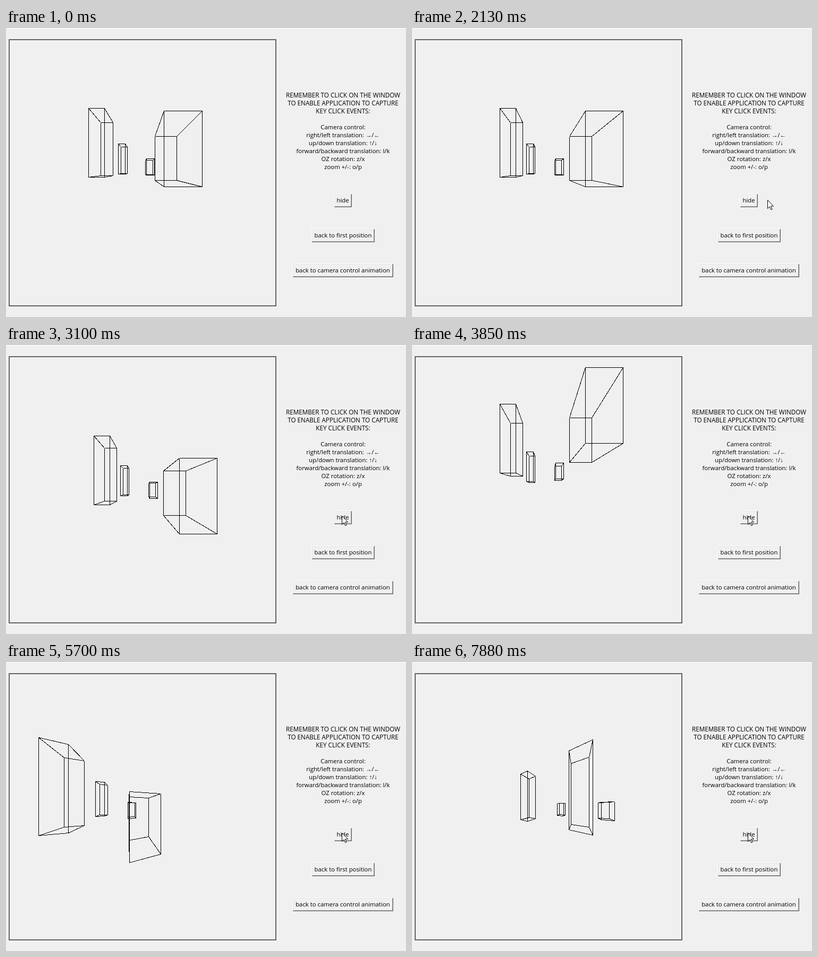
An HTML page for the animation above (8 s loop, 753 px wide and 545 px high).

```html
<!DOCTYPE html>
<html lang="en">
<head>
<meta charset="utf-8">
<title>Camera control</title>
<style>
  html, body { margin: 0; width: 753px; height: 545px; overflow: hidden; background: #f0f0f0; }
  svg { display: block; }
  text { font: 11.35px "Open Sans", "Noto Sans", sans-serif; text-anchor: middle; }
  .caps { font-size: 11.7px; }
  .sharp { shape-rendering: crispEdges; }
  #scene path { stroke: #000; fill: none; }
  #scene.solid path { stroke: #f00; fill: #1f1; }
</style>
</head>
<body>
<svg width="753" height="545" viewBox="0 0 753 545">
  <clipPath id="view"><rect x="7" y="23" width="500" height="500"/></clipPath>
  <rect class="sharp" width="753" height="1" fill="#fff"/>
  <rect class="sharp" x="6" y="22" width="502" height="502" fill="none" stroke="#646464" stroke-width="2"/>
  <g clip-path="url(#view)"><g id="scene" class="sharp"></g></g>
  <g id="help"></g>
  <g id="buttons"></g>
  <path id="cursor" d="M.5 .5V16.5L4.2 13L6.8 18.7L9 17.7L6.5 12H11.5Z" fill="#fff" stroke="#000"/>
</svg>
<script>
const NS = 'http://www.w3.org/2000/svg';
const $ = id => document.getElementById(id);

function add(parent, tag, attrs, label = '') {
  const el = document.createElementNS(NS, tag);
  for (const k in attrs) el.setAttribute(k, attrs[k]);
  el.textContent = label;
  return parent.appendChild(el);
}

[
  'REMEMBER TO CLICK ON THE WINDOW', 'TO ENABLE APPLICATION TO CAPTURE', 'KEY CLICK EVENTS:', '',
  'Camera control:', 'right/left translation: →/←', 'up/down translation: ↑/↓',
  'forward/backward translation: l/k', 'OZ rotation: z/x', 'zoom +/-: o/p'
].forEach((line, i) =>
  add($('help'), 'text', { x: 634.5, y: 131 + 15 * i, class: i < 3 ? 'caps' : '' }, line));

function button(x, y, w, label) {
  const g = add($('buttons'), 'g', { transform: `translate(${x} ${y})` });
  const bevel = (inset, lit) => add(g, 'path', {
    class: 'sharp', fill: 'none', 'stroke-linecap': 'square',
    d: lit ? `M${inset + .5} ${25.5 - inset}V${inset + .5}H${w - inset - .5}`
           : `M${inset + .5} ${25.5 - inset}H${w - inset - .5}V${inset + .5}`
  });
  const edges = [bevel(0, false), bevel(1, false), bevel(0, true), bevel(1, true)];
  const text = add(g, 'text', { x: w / 2, y: 17 }, label);
  const raised = ['#696969', '#a0a0a0', '#fff', '#e3e3e3'];
  const sunken = ['#fff', '#e3e3e3', '#a0a0a0', '#696969'];
  const press = down => {
    edges.forEach((e, i) => e.setAttribute('stroke', (down ? sunken : raised)[i]));
    text.setAttribute('transform', down ? 'translate(1 1)' : '');
  };
  press(false);
  return press;
}
const pressHide = button(617, 312, 34, 'hide');
button(575, 378, 119, 'back to first position');
button(539, 444, 190, 'back to camera control animation');

// Boxes, far to near: x, top, z, side, height
const boxes = [[-10, -12, 23, 3, 13], [1.5, -4, 16.5, 2.5, 5], [-10, -12, 10, 3, 13], [1.5, -4, 3.5, 2.5, 5]];
// Corner bits: 1 right, 2 bottom, 4 back
const faces = ['5467', '4026', '1573', '4510', '2376', '0132'];
const edges = ['01', '23', '45', '67', '02', '13', '46', '57', '04', '15', '26', '37'];
const paths = boxes.map(() => add($('scene'), 'path', {}));

// x, y: first moves; turn: 15 degree steps; pan: move at 30 degrees; end: last move
const start = { x: 0, y: 0, turn: 0, pan: 0, end: 0, cursor: null, solid: false, down: false };
const steps = [
  [150, { cursor: [707, 366] }], [300, { cursor: [689, 346] }], [440, { cursor: [675, 330] }],
  [590, { cursor: [669, 324] }], [790, { x: 1 }],
  [1160, { y: -1 }], [1310, { y: -2 }], [1460, { y: -3 }], [1740, { y: -2 }], [1860, { y: -1 }],
  [2130, { y: 0 }], [2250, { y: 1 }], [2400, { y: 2 }], [2550, { y: 3 }],
  [2690, { cursor: [648, 328] }], [2830, { cursor: [633, 325] }],
  [3100, { y: 2, cursor: [632, 322] }], [3220, { y: 1 }], [3350, { y: 0 }], [3470, { y: -1 }],
  [3600, { y: -2 }], [3720, { y: -3 }], [3850, { y: -4 }],
  [4130, { y: -5 }], [4260, { y: -6 }], [4410, { down: true }], [4560, { down: false, solid: true }],
  [4710, { y: -5, solid: false }], [5250, { y: -3 }], [5400, { y: 3 }],
  [5700, { turn: 1 }], [5820, { turn: 2 }], [5940, { pan: 1 }],
  [6470, { pan: 2 }], [6620, { pan: 8 }], [6770, { pan: 15 }], [6900, { pan: 22 }], [7030, { pan: 29 }],
  [7240, { turn: 3 }], [7360, { turn: 4 }], [7630, { end: 1 }], [7880, { end: 2 }]
];

const PIVOT = 9, FOCAL = 100;

function rotate([x, z], n) {
  const a = n * Math.PI / 12, c = Math.cos(a), s = Math.sin(a);
  return [x * c - z * s, x * s + z * c];
}

// Whole pixels, rounded down; the half puts the line on the pixel centre
const snap = v => Math.floor(v + 1e-6) + .5;

function project(x, y, z, s) {
  let p = rotate([x + s.x, z + PIVOT], Math.min(s.turn, 2));
  p = rotate([p[0] + s.pan, p[1]], Math.max(s.turn - 2, 0));
  const k = FOCAL / (p[1] - PIVOT);
  return [snap(255 + (p[0] + s.end) * k), snap(271 + (y + s.y) * k)];
}

function facing(pts) {
  return pts.reduce((sum, [x, y], i) => {
    const [u, v] = pts[(i + 1) % pts.length];
    return sum + x * v - u * y;
  }, 0) > 0;
}

function draw(s) {
  boxes.forEach(([x, y, z, side, h], b) => {
    const corners = [...Array(8).keys()].map(i =>
      project(x + (i & 1) * side, y + (i >> 1 & 1) * h, z + (i >> 2) * side, s));
    const pick = list => list.map(ids => [...ids].map(n => corners[n]));
    const d = s.solid
      ? pick(faces).filter(facing).map(pts => 'M' + pts.join('L') + 'Z')
      : pick(edges).map(pts => 'M' + pts.join('L'));
    paths[b].setAttribute('d', d.join(''));
  });
  $('scene').classList.toggle('solid', s.solid);
  pressHide(s.down);
  $('cursor').style.display = s.cursor ? '' : 'none';
  if (s.cursor) $('cursor').setAttribute('transform', `translate(${s.cursor})`);
}

let last = -1;
function tick() {
  const t = performance.now() % 8000;
  const done = steps.filter(([at]) => at <= t);
  if (done.length !== last) {
    last = done.length;
    draw(Object.assign({}, start, ...done.map(d => d[1])));
  }
  requestAnimationFrame(tick);
}
tick();
</script>
</body>
</html>
```
